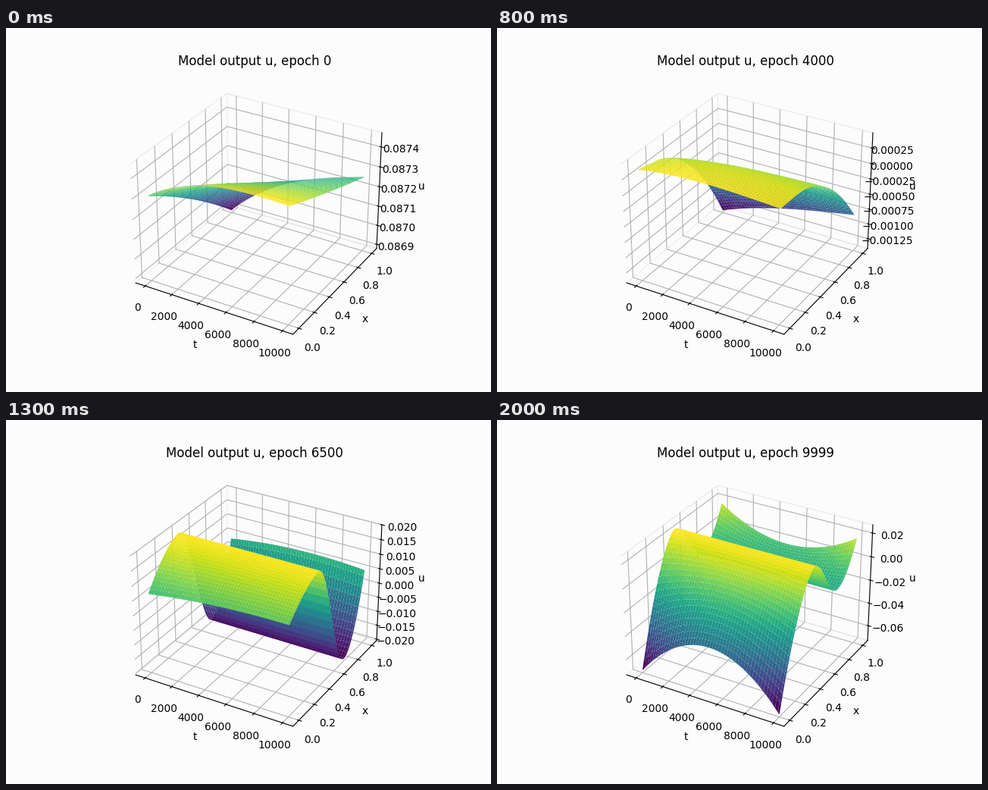
Animation of 640 by 480 pixels, one loop 2.1 s. Source, as a matplotlib script:

```python
import numpy as np
import matplotlib.pyplot as plt
from matplotlib.animation import FuncAnimation

FRAMES = 21
BG = "#fcfcfc"

t, x = np.meshgrid(np.linspace(0, 1, 100), np.linspace(0, 1, 100))
arch = 4 * t * (1 - t)


def fit(z, lo, hi):
    return lo + (hi - lo) * (z - z.min()) / (z.max() - z.min())


def sheet(a, b, d, bow, bend):
    """Twisted sheet with corners a, b, 0 and d, arched along t and x."""
    flat = (1 - x) * (a + (b - a) * t) + x * d * t
    return flat + bow * np.sin(np.pi * t ** .8) + 4 * x * (1 - x) * bend


def slope(drop):
    """Flat shelf that bends down towards x = 1."""
    return 1 - drop * (np.maximum(x - .2, 0) / .8) ** 2


def wave(edge, crest_x, valley, valley_x, end):
    """Rise from edge to a crest at 1, swing down to the valley, rise to end."""
    rise = 1 - (1 - edge) * np.clip(1 - x / crest_x, 0, 1) ** 1.6
    s = np.clip((x - crest_x) / (valley_x - crest_x), 0, 1)
    swing = (1 - valley) * (1 - np.cos(np.pi * s)) / 2
    lift = (end - valley) * np.clip((x - valley_x) / (1 - valley_x), 0, 1) ** 1.9
    return rise - swing + lift


# step, easing power of the change leading to it, surface
KEYS = [
    (0, 1, fit(sheet(.735, 1, .655, .12, .04 - .05 * t), .08689, .087458)),
    (2, .001, fit(sheet(.87, .905, .505, .145, .03 + .06 * t), -.00041, .000154)),
    (6, 1, fit(sheet(.855, .92, .51, .145, .03 + .06 * t), -.000398, .000149)),
    (10, 3, fit(slope(.99 - .24 * t), -.00824, .00262)),
    (13, 1.5, fit(wave(.68 + .09 * t + .025 * arch, .36, 0, .74,
                       .6 + .04 * t + .04 * arch), -.0197, .0192)),
    (17, 1, fit(wave(.285 * arch, .42, .57, .74, .92 - .18 * arch),
                -.0578, .02595)),
    (20, 1, fit(wave(.395 * arch, .42, .62, .74, .92 - .21 * arch),
                -.0712, .0249)),
]


def output(i):
    for (a, _, za), (b, power, zb) in zip(KEYS, KEYS[1:]):
        if i <= b:
            return za + (zb - za) * ((i - a) / (b - a)) ** power


fig = plt.figure(figsize=(6.4, 4.8), dpi=100, facecolor=BG)
ax = fig.add_subplot(111, projection="3d", facecolor=BG)


def draw(i):
    ax.clear()
    ax.plot_surface(t * 10000, x, output(i), cmap="viridis")
    for axis in (ax.xaxis, ax.yaxis, ax.zaxis):
        axis.pane.set_facecolor(BG)
        axis.pane.set_edgecolor("#dcdcdc")
    ax.set_xlabel("t")
    ax.set_ylabel("x")
    ax.set_zlabel("u")
    ax.set_title(f"Model output u, epoch {min(500 * i, 9999)}")
    return []


anim = FuncAnimation(fig, draw, frames=FRAMES, init_func=lambda: [],
                     interval=100, repeat=True, repeat_delay=0)
plt.show()
```
